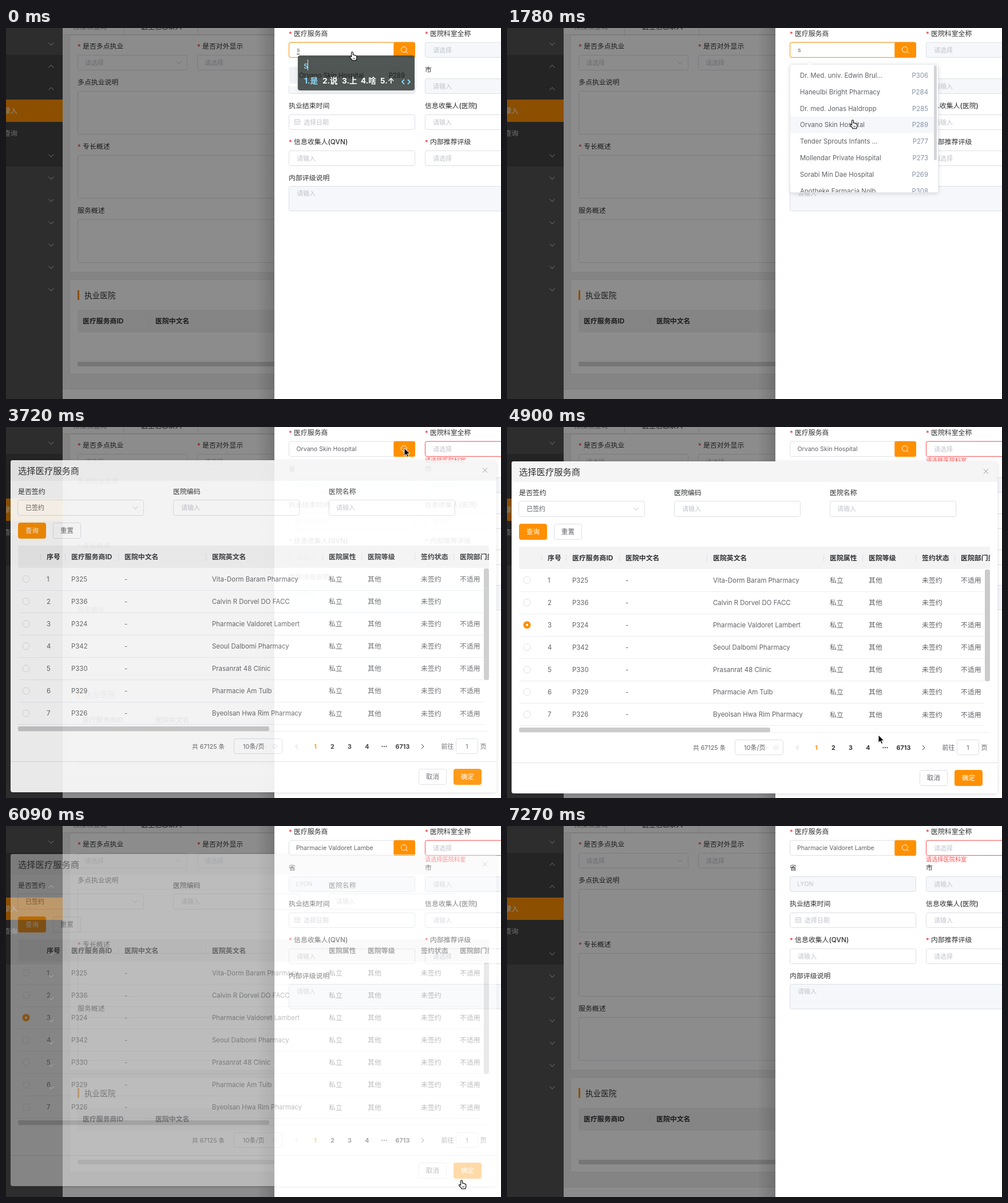
Write an HTML page that moves like this. It is 865x648 px and loops after 7570 ms.

```html
<!DOCTYPE html>
<html lang="zh-CN">
<head>
<meta charset="utf-8">
<title>选择医疗服务商</title>
<style>
html, body { margin: 0; width: 100%; height: 100%; overflow: hidden; background: #fff; }
svg { display: block; width: 865px; height: 648px; }
text { font-family: Inter, 'Noto Sans CJK SC', 'Noto Sans CJK', sans-serif; white-space: pre; }
#dropdown { transform-origin: 0 63px; }
</style>
</head>
<body>
<svg id="stage" viewBox="0 0 865 648"></svg>
<script>
const LOOP = 7570;
const ORANGE = '#ff9000', RED = '#ff4d4f', LINE = '#dcdfe6', HINT = '#c0c4cc', BODY = '#606266', INK = '#303133', MUTED = '#f5f7fa';

// ---- drawing helpers: text is placed by its vertical centre ----
const text = (x, cy, str, { size = 11.9, fill = BODY, weight = 400, anchor = 'start' } = {}) => {
  const s = /[^\x00-\x7f]/.test(str) ? size : size * .96;
  return `<text x="${x}" y="${cy + s * .37}" font-size="${s}" fill="${fill}" font-weight="${weight}" text-anchor="${anchor}">${str}</text>`;
};
const rect = (x, y, w, h, fill, extra = '') => `<rect x="${x}" y="${y}" width="${w}" height="${h}" fill="${fill}" ${extra}/>`;
const box = (x, y, w, h, fill = '#fff', stroke = LINE, id = '') =>
  rect(x + .5, y + .5, w - 1, h - 1, fill, `rx="3" stroke="${stroke}" ${id && `id="${id}"`}`);
const path = (d, stroke, width = 1, fill = 'none') =>
  `<path d="${d}" fill="${fill}" stroke="${stroke}" stroke-width="${width}" stroke-linejoin="round"/>`;
const group = (id, ...parts) => `<g id="${id}">${parts.join('')}</g>`;
const chevron = (x, y, up, color, r = 4.5) => {
  const d = up ? -r / 2 : r / 2;
  return path(`M${x - r} ${y - d}L${x} ${y + d}L${x + r} ${y - d}`, color);
};
const label = (x, cy, str, required) => (required ? text(x, cy + 1, '*', { fill: '#f5222d', size: 12 }) : '') +
  text(x + (required ? 9 : 0), cy, str, { fill: INK, weight: 500 });
const hint = (x, cy, str) => text(x, cy, str, { fill: HINT, size: 11 });
const button = (x, y, str, primary, id) => box(x, y, 49, 28, primary ? ORANGE : '#fff', primary ? ORANGE : LINE, id) +
  text(x + 24.5, y + 14, str, { anchor: 'middle', size: 11.4, fill: primary ? '#fff' : BODY });

// ---- dimmed page behind the drawer ----
const sidebar = () => rect(0, 0, 99, 648, '#525252') + rect(0, 47, 99, 195, '#424242') + rect(0, 125, 99, 39, ORANGE) +
  [28, 67, 106, 223, 262, 301, 340, 379, 418, 457]
    .map(y => chevron(79, y, y === 67 || y === 106, '#ddd')).join('') +
  text(20, 145, '录入', { fill: '#fff', anchor: 'end' }) + text(20, 184, '查询', { fill: '#ccc', anchor: 'end' });

const page = () => [
  rect(99, 0, 370, 648, '#f0f0f0'), rect(99, 0, 370, 11, '#fafafa'), rect(99, 11, 370, 1, '#ddd'),
  rect(205, 0, 1, 11, '#ddd'), rect(335, 0, 1, 11, '#ddd'),
  text(117, -2, '预授权查询', { fill: '#888' }), text(236, -2, '医生信息录入', { fill: INK, weight: 500 }),
  box(111, 12, 400, 415, '#fff', '#e4e4e4'),
  label(125, 32, '是否多点执业', true), box(125, 47, 192, 27), hint(138, 60.5, '请选择'), chevron(302, 60.5, false, HINT),
  label(334, 32, '是否对外显示', true), box(334, 47, 192, 27), hint(347, 60.5, '请选择'),
  label(125, 95, '多点执业说明'), box(125, 110, 400, 76),
  label(125, 207, '专长概述', true), box(125, 222, 400, 76),
  label(125, 319, '服务概述'), box(125, 334, 400, 76),
  box(111, 439, 400, 166, '#fff', '#e4e4e4'),
  rect(125, 458, 3, 17, ORANGE), text(137, 466.5, '执业医院', { size: 13.6, fill: INK, weight: 500 }),
  rect(125, 492, 400, 40, '#f2f2f2'), rect(250, 506, 1, 12, '#ddd'),
  text(134, 512, '医疗服务商ID', { fill: INK, weight: 700 }), text(261, 512, '医院中文名', { fill: INK, weight: 700 }),
  rect(125, 583, 400, 8, '#d6d6d6', 'rx="2"'),
  rect(99, 631, 370, 17, '#fff'), rect(99, 630, 370, 1, '#ddd'),
  sidebar(),
  rect(0, 0, 469, 648, '#000', 'opacity=".45"'),
  rect(437, 0, 32, 648, 'url(#shade)'),
].join('');

// ---- drawer form ----
const CLINIC = 'Orvano Skin Hospital', CHEMIST = 'Pharmacie Valdoret Lambert';
const TOP = 24.7, FIELD = 27.2;
const drawer = () => [
  rect(469, 0, 396, 648, '#fff'),
  label(494, 10, '医疗服务商', true), box(494, TOP, 221, FIELD),
  box(494, TOP, 221, FIELD, 'none', ORANGE, 'focus'),
  rect(677.3, TOP, 37.7, FIELD, ORANGE, 'rx="3"'),
  `<circle cx="695.3" cy="37.6" r="4.9" fill="none" stroke="#fff"/>`, path('M698.8 41.2l3 3', '#fff'),
  group('typed', text(508, 38.5, 's', { size: 11.05 })),
  rect(513, 30, 1, 16, INK, 'id="caret"'),
  group('firstName', text(507.5, 38.5, CLINIC, { size: 11.05 })),
  group('secondName', text(507, 38.5, CHEMIST.slice(0, -2), { size: 11.05 })),
  label(732, 10, '医院科室全称', true), box(732, TOP, 221, FIELD, MUTED),
  box(732, TOP, 221, FIELD, '#fff', RED, 'invalid'), hint(746, 38.5, '请选择'),
  group('error', text(732, 58, '请选择医院科室', { size: 10.2, fill: RED })),
  label(494, 73, '省'), box(494, 88, 221, 27, MUTED), label(732, 73, '市'), box(732, 88, 221, 27, MUTED),
  group('province', hint(508, 101.5, '请输入')), group('city', hint(746, 101.5, '请输入')),
  group('firstCity', hint(507, 101.5, 'Daejeon'), hint(745, 101.5, 'Daejeon')),
  group('secondCity', hint(507, 101.5, 'LYON')),
  label(494, 136, '执业结束时间'), box(494, 151, 221, 27), hint(520, 164.5, '选择日期'),
  path('M504.5 160.5h9v8h-9zM504.5 163.5h9M506.5 159v2M511.5 159v2M506.5 166h5', HINT, .9),
  label(732, 136, '信息收集人(医院)'), box(732, 151, 221, 27), hint(746, 164.5, '请输入'),
  label(494, 199, '信息收集人(QVN)', true), box(494, 214, 221, 27), hint(508, 227.5, '请输入'),
  label(732, 199, '内部推荐评级', true), box(732, 214, 221, 27), hint(746, 227.5, '请选择'),
  label(494, 262, '内部评级说明'), box(494, 276, 460, 44, MUTED), hint(508, 289, '请输入'),
].join('');

const inputMethod = () => group('ime',
  rect(494, 63, 221, 39, '#fff', 'rx="3"'), rect(495, 68, 219, 29, '#f0f2f5'), hint(508, 102, '请输入'),
  rect(508, 45, 5, 1, INK),
  rect(510, 48, 204, 61, '#434846', 'rx="4" opacity=".92" filter="url(#lift)"'),
  text(512, 82.5, CLINIC, { fill: '#1e2020' }), text(697, 82.5, 'P289', { fill: '#1e2020', anchor: 'end' }),
  text(520, 65, 's', { size: 16, fill: '#9fdcf8' }), rect(527, 55, 1, 19, '#c8ecff'),
  ['1.是', '2.说', '3.上', '4.啥', '5.↑'].map((s, i) =>
    text([521, 553, 587, 620, 654][i], 92, s, { size: 13.6, weight: 700, fill: i ? '#fff' : '#8fdcff' })).join(''),
  path('M696 90l-4 4 4 4M702 90l4 4-4 4', '#7fd6ff', 1.8));

const OPTIONS = [['Dr. Med. univ. Edwin Brul...', 306], ['Haneulbi Bright Pharmacy', 284], ['Dr. med. Jonas Haldropp', 285],
  [CLINIC, 289], ['Tender Sprouts Infants ...', 277], ['Mollendar Private Hospital', 273],
  ['Sorabi Min Dae Hospital', 269], ['Apotheke Farmacia Nolb', 308]];
const dropdown = () => group('dropdown',
  rect(494.5, 63.5, 259, 224, '#fff', 'rx="3" stroke="#e4e7ed" filter="url(#lift)"'),
  path('M524 63.5l5.5-5 5.5 5', '#e4e7ed', 1, '#fff'),
  rect(495, 155, 258, 28.5, MUTED),
  `<g clip-path="url(#list)">`,
  ...OPTIONS.map(([name, code], i) => text(512, 82.7 + i * 28.85, name) +
    text(736, 82.7 + i * 28.85, 'P' + code, { fill: '#8492a6', anchor: 'end' })),
  '</g>', rect(746, 65, 5, 166, '#d3d5d8', 'rx="2.5"'));

// ---- dialog ----
const COLUMNS = [['序号', 71], ['医疗服务商ID', 114], ['医院中文名', 207], ['医院英文名', 360], ['医院属性', 564],
  ['医院等级', 632], ['签约状态', 725], ['医院部门类', 793]];
const ROWS = [[325, 'Vita-Dorm Baram Pharmacy'], [336, 'Calvin R Dorvel DO FACC'], [324, CHEMIST], [342, 'Seoul Dalbomi Pharmacy'],
  [330, 'Prasanrat 48 Clinic'], [329, 'Pharmacie Am Tulb'], [326, 'Byeolsan Hwa Rim Pharmacy']];
const tableRow = ([code, name], i) => {
  const y = 267.5 + i * 39.1;
  const cells = [i + 1, 'P' + code, '-', name, '私立', '其他', '未签约', i === 1 ? '' : '不适用'];
  return `<circle cx="35" cy="${y}" r="6" fill="#fff" stroke="${LINE}"/>` +
    cells.map((c, k) => text(COLUMNS[k][1], y, String(c))).join('') + rect(21, Math.round(y + 19), 814, 1, '#ebeef5');
};
const pager = () => [
  text(325, 560, '共 67125 条', { size: 10.7 }),
  box(398, 546, 85, 27), text(414, 560, '10条/页', { size: 11 }), chevron(453, 560, false, LINE, 3.5),
  `<circle cx="470" cy="560" r="3.6" fill="none" stroke="${LINE}"/>`, path('M468.3 560l1.3 1.3 2.3-2.5', LINE, .8),
  path('M509.5 556.5l-3.5 3.5 3.5 3.5', HINT), path('M726 556l4 4-4 4', INK),
  ...[['1', 540.5], ['2', 570.5], ['3', 600.5], ['4', 631], ['6713', 693]].map(([n, x]) =>
    text(x, 560, n, { size: 11.2, weight: 700, anchor: 'middle', fill: n === '1' ? ORANGE : INK })),
  ...[657.5, 661, 664.5].map(x => `<circle cx="${x}" cy="560" r="1.1" fill="${INK}"/>`),
  text(760.5, 560, '前往', { size: 11.05 }), box(786, 546, 39, 27), text(805.5, 560, '1', { size: 11.05, anchor: 'middle' }),
  text(828.5, 560, '页', { size: 11.05 }),
].join('');
const dialog = () => group('dialog',
  rect(8, 60, 849, 580, '#fff', 'rx="4" filter="url(#lift)"'),
  path('M8 96V64q0-4 4-4H853q4 0 4 4V96z', 'none', 0, '#f5f5f5'),
  text(21, 78, '选择医疗服务商', { size: 15.3, fill: INK }), path('M833 73.5l8 8m0-8l-8 8', '#909399'),
  label(21, 115, '是否签约'), box(20, 129, 221, 28), text(34, 143, '已签约', { size: 11.05 }), chevron(226, 143, false, HINT),
  label(292, 115, '医院编码'), box(292, 129, 221, 28), hint(306, 143, '请输入'),
  label(564, 115, '医院名称'), box(564, 129, 221, 28), hint(577, 143, '请输入'),
  button(21, 169, '查询', true), button(82, 169, '重置'),
  rect(21, 209, 823, 39, '#f3f3f4'),
  '<g clip-path="url(#table)">',
  ...COLUMNS.map(([name, x]) => rect(x - 11, 223, 1, 12, LINE) + text(x, 228.5, name, { fill: INK, weight: 700 })),
  ...ROWS.map(tableRow), '</g>',
  group('picked', `<circle cx="35" cy="345.7" r="6.5" fill="${ORANGE}"/><circle cx="35" cy="345.7" r="2" fill="#fff"/>`),
  rect(835, 249, 9, 195, '#cbcbcb', 'rx="3"'), rect(21, 525, 439, 8, '#cbcbcb', 'rx="3"'), rect(21, 533, 823, 1, '#ebeef5'),
  pager(),
  rect(8, 586, 849, 1, '#e2e2e2'), button(721, 599, '取消'), button(782, 599, '确定', true, 'confirm'));

const cursors = () =>
  group('hand', path('M3.6 8.6V2.2a1.4 1.4 0 0 1 2.8 0V6q2-.6 2.6.6 1.7-.4 2.1.8 1.7-.1 1.7 1.5v2.5q0 2-1.2 3.4v1H5v-1Q3 13 .9 10.2q-.8-1.6.5-2 1.2-.2 2.2 1.4z', '#000', 1.1, '#fff'),
    path('M7 11v2.6M9.2 11v2.6', '#000', .8)) +
  group('arrow', path('M0 0V13.5L3.2 10.6 5.3 15.4 7.6 14.4 5.5 9.8H10Z', '#fff', 1, '#000'));

document.getElementById('stage').innerHTML = `<defs>
  <linearGradient id="shade"><stop stop-color="#000" stop-opacity="0"/><stop offset="1" stop-color="#000" stop-opacity=".16"/></linearGradient>
  <filter id="lift" x="-10%" y="-10%" width="120%" height="130%"><feDropShadow dx="0" dy="1.5" stdDeviation="3.5" flood-opacity=".13"/></filter>
  <clipPath id="list">${rect(495, 64, 258, 223, '#000')}</clipPath>
  <clipPath id="table">${rect(21, 209, 823, 316, '#000')}</clipPath>
</defs>` + page() + drawer() + inputMethod() + dropdown() + dialog() + cursors();

// ---- motion: every table row holds until the next one ----
const play = (id, rows) => {
  const frames = rows.map(([t, style]) => ({ ...style, offset: t / LOOP, easing: 'step-end' }));
  frames.push({ ...rows.at(-1)[1], offset: 1 });
  document.getElementById(id).animate(frames, { duration: LOOP, iterations: Infinity });
};
const fade = (id, rows) => play(id, rows.map(([t, opacity]) => [t, { opacity }]));
const show = (id, from, to = LOOP) => fade(id, [
  ...(from > 0 ? [[0, 0]] : []), [from, 1], ...(to < LOOP ? [[to, 0]] : [])]);

show('ime', 0, 300);
show('typed', 0, 2230);
show('focus', 0, 3420);
fade('caret', [[0, 0], [300, 1], [750, 0], [1190, 1], [1780, 0]]);
show('firstName', 2230, 6090);
show('secondName', 6090);
show('province', 0, 2820);
fade('city', [[0, 1], [2820, 0], [6090, 1]]);
show('firstCity', 2820, 6090);
show('secondCity', 6090);
fade('invalid', [[0, 0], [2820, .4], [2970, .75], [3120, 1]]);
play('error', [[0, 0, -4], [2820, .35, -3], [2970, .8, -1], [3120, 1, 0]]
  .map(([t, opacity, y]) => [t, { opacity, transform: `translateY(${y}px)` }]));
play('dropdown', [[0, 0, 0], [1190, .4, .4], [1340, .95, .95], [1490, 1, 1], [2230, .85, .9], [2380, .25, .35], [2530, 0, 0]]
  .map(([t, opacity, s]) => [t, { opacity, transform: `scaleY(${s})` }]));
play('dialog', [[0, 0, -20], [3570, .42, -11], [3720, .9, -2], [3870, 1, 0], [6090, .42, -11], [6240, .06, -19], [6390, 0, -20]]
  .map(([t, opacity, y]) => [t, { opacity, transform: `translateY(${y}px)` }]));
show('picked', 4450);
play('confirm', [[0, { fill: ORANGE, stroke: ORANGE }], [5640, { fill: '#ffa633', stroke: '#ffa633' }]]);

const TRACK = [
  [0, 'hand', 600, 41], [1190, 'hand', 600, 66], [1340, 'hand', 600, 114], [1490, 'hand', 600, 148], [1640, 'hand', 599, 160],
  [2530, 'arrow', 613, 152], [2680, 'arrow', 636, 118], [2820, 'arrow', 652, 92], [2970, 'arrow', 661, 77],
  [3120, 'arrow', 680, 56], [3270, 'arrow', 696, 37],
  [3870, 'arrow', 668, 60], [4010, 'arrow', 540, 140], [4160, 'arrow', 290, 255], [4300, 'arrow', 95, 332], [4450, 'hand', 33, 344],
  [4600, 'arrow', 270, 440], [4750, 'arrow', 560, 518], [4900, 'arrow', 649, 538],
  [5200, 'arrow', 690, 566], [5350, 'arrow', 745, 596], [5500, 'hand', 783, 613], [5640, 'hand', 791, 618],
  [6390, 'arrow', 795, 619], [6840, 'arrow', 800, 625], [6990, 'arrow', 807, 633], [7140, 'arrow', 816, 641], [7270, 'none', 820, 660]];
for (const id of ['hand', 'arrow'])
  play(id, TRACK.map(([t, kind, x, y]) => [t, { opacity: +(kind === id), transform: `translate(${x}px, ${y}px)` }]));
</script>
</body>
</html>
```
